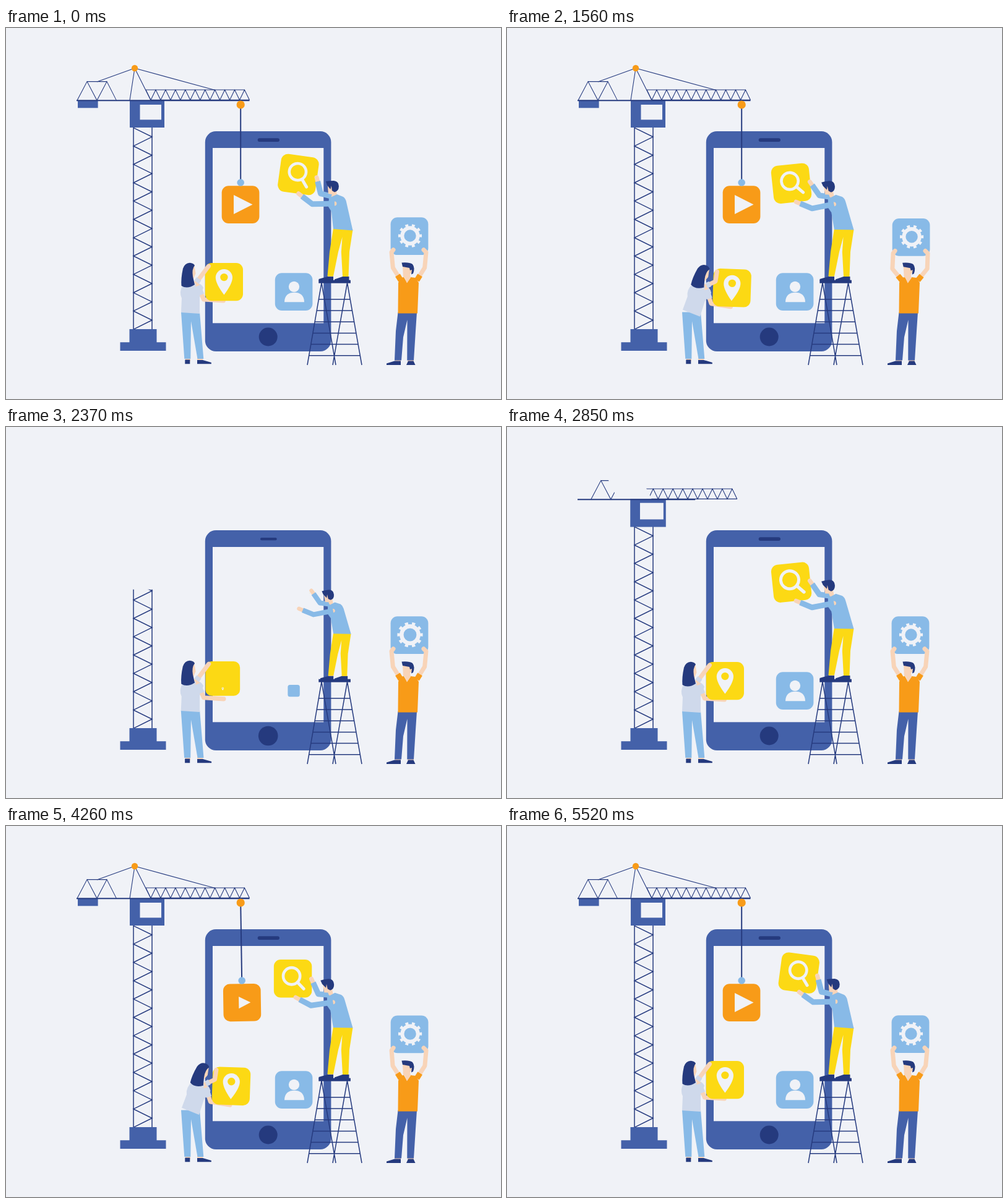
Write an HTML page that moves like this. It is 800 px wide and 600 px high and loops after 5.55 s.

```html
<!DOCTYPE html>
<html lang="en">
<head>
<meta charset="utf-8">
<title>Building an app</title>
<style>
html, body { margin: 0; width: 100%; height: 100%; overflow: hidden; background: #f0f2f7; }
svg { display: block; width: 100vw; height: 100vh; }
.bg { fill: #f0f2f7; }
.blue { fill: #4461a9; }
.navy { fill: #253a7e; }
.sky { fill: #88bae7; }
.yellow { fill: #fcd914; }
.orange { fill: #f89b18; }
.skin { fill: #f8d4b8; }
.lilac { fill: #cfd9eb; }
.line { fill: none; stroke: #263b7f; stroke-width: 1.5; }
.thin { stroke-width: 1.1; }
.thick { stroke-width: 2; }
.arm path { fill: none; stroke: #f8d4b8; stroke-width: 7; stroke-linejoin: round; stroke-linecap: round; }
.arm path + path { stroke: currentColor; stroke-width: 9; stroke-linecap: butt; }
</style>
</head>
<body>
<svg viewBox="0 0 800 600">
  <defs>
    <clipPath id="towerClip"><rect id="towerMask" x="200" width="42"/></clipPath>
    <clipPath id="leftClip"><path d="M100 80H161L180 119H100Z"/></clipPath>
    <clipPath id="rightClip"><path d="M410 97H224L235 119H410Z"/></clipPath>
  </defs>

  <rect id="phone" class="blue" x="321.8" width="203.6"/>
  <rect id="screen" class="bg" x="334" width="179.3"/>
  <rect id="speaker" class="navy" x="406.7" y="178.2" width="35.3" height="5.8" rx="2.9"/>
  <circle id="home" class="navy" cx="423.7" cy="499.5" r="15"/>
  <g id="user">
    <rect class="sky" x="434.8" y="396.3" width="60.6" height="60.6" rx="11"/>
    <g id="userGlyph" class="bg">
      <circle cx="465.5" cy="418.4" r="8.6"/>
      <path d="M450 443.3C450 432 457 427.7 466 427.7S482 432 482 443.3Z"/>
    </g>
  </g>

  <path id="base" class="blue" d="M199.5 487H243.5V508.3H258.5V522H184.5V508.3H199.5Z"/>
  <path id="tower" class="line" clip-path="url(#towerClip)"/>
  <rect id="weight" class="blue" x="116" y="117" width="32.6" height="12.3"/>
  <g id="cab">
    <rect class="blue" x="200" y="117" width="56" height="44"/>
    <rect id="pane" class="bg" x="216.5" y="124" width="34.5" height="24.3"/>
  </g>
  <g clip-path="url(#leftClip)">
    <path id="leftTruss" class="line thin" d="M115 117L131 86.6L147 117L163 86.6L178.5 117M131 86.6H163"/>
  </g>
  <g clip-path="url(#rightClip)"><path id="rightTruss" class="line thin"/></g>
  <path id="beam" class="line thick"/>
  <path id="cables" class="line thin"/>
  <circle id="peak" class="orange" cx="208" cy="65" r="5.2"/>

  <g id="swing">
    <path id="rope" class="line thick"/>
    <g id="play">
      <rect class="orange" x="348.7" y="255.2" width="60.7" height="60.7" rx="11"/>
      <path id="playGlyph" class="bg" d="M368 270L398.5 285.5L368 301Z"/>
    </g>
    <circle id="knob" class="sky" cx="379.2" cy="250" r="5.8"/>
  </g>
  <circle id="hook" class="orange" cx="379.2" cy="124" r="6.6"/>

  <g id="woman">
    <path class="skin" d="M290 533H298V539H290ZM309 533H318V539H309Z"/>
    <path class="navy" d="M289.3 536.5H297.3V543.3H289.3ZM309 537H318L331.8 541V543.3H309Z"/>
    <path class="sky" d="M283 459.5H313L319.3 535H309.5L299 474L298.3 535H288.3Z"/>
    <path id="wBody" class="lilac" d="M286 415L304 414Q313 409 319 420L313 436V462L283 460L284 437Q279 427 286 415Z"/>
    <g id="wLow" class="arm" color="#cfd9eb"></g>
    <g id="wIcon">
      <rect class="yellow" x="-30.6" y="-30.6" width="61.2" height="61.2" rx="11"/>
      <g id="pin">
        <path class="bg" d="M0 21Q-13.6 3 -13.6 -7A13.6 13.6 0 0 1 13.6 -7Q13.6 3 0 21Z"/>
        <circle class="yellow" cy="-7.5" r="6.2"/>
      </g>
    </g>
    <g id="wHigh" class="arm" color="#cfd9eb"></g>
    <g id="wHead">
      <path class="skin" d="M299 385H304.5L306.5 397L304 403L300 413H295Z"/>
      <path class="navy" d="M283.5 417Q282.5 405 286 389Q289 380 297 379.7Q303 380 305 384Q300 390 302 402L305 415Q293 423 283.5 417Z"/>
    </g>
  </g>

  <g id="ladder">
    <path id="ladderLines" class="line"/>
    <rect class="navy" x="505.3" y="407.7" width="51.6" height="5"/>
  </g>

  <g id="climber">
    <path class="skin" d="M520 399H529V404H520ZM544 399H553V404H544Z"/>
    <path class="navy" d="M505.5 409V406L520 402H529V409ZM531 409V406.5L544 402H554.5V409Z"/>
    <path class="yellow" d="M529 324L560.5 326L555 362L553.5 402H544L541.8 362L543.5 338L537 362L529 401.5H519.5L523 362Z"/>
    <g id="cIcon">
      <rect class="yellow" x="-30.7" y="-30.7" width="61.4" height="61.4" rx="11"/>
      <g id="lens" fill="none" stroke="#f0f2f7">
        <circle cx="-2" cy="-4" r="13.6" stroke-width="4.6"/>
        <path d="M7.5 6L17.5 16.5" stroke-width="5" stroke-linecap="round"/>
      </g>
    </g>
    <g id="cHigh" class="arm" color="#88bae7"></g>
    <g id="cHead">
      <path class="skin" d="M520 254L528 252L534 262L535 272L528 273L527 269L521 268Z"/>
      <path class="navy" d="M517 248Q522 247 530 247Q538 248 538 256Q538 264 531 265.5L527 263L526 255L524.5 261L519 254Z"/>
    </g>
    <path id="cBody" class="sky" d="M522 275L535 269L545 273Q549 276 550 281L560.5 327.5L529 325L526 297L521 289Z"/>
    <g id="cLow" class="arm" color="#88bae7"></g>
  </g>

  <g id="lifter">
    <path class="skin" d="M629 535H638V540H629ZM649 535H659V540H649Z"/>
    <path class="navy" d="M615 545V542.5L628 538.5H638V545ZM647 545L650 538.5H658.5L661.5 545Z"/>
    <path class="blue" d="M633.5 460H664L662 490L659 537.5H648.3L648.5 472L642 500L639 537.5H628L630 490Z"/>
    <g id="lIcon">
      <rect class="sky" x="-30.4" y="-30.4" width="60.8" height="60.8" rx="11"/>
      <g id="gear" fill="none" stroke="#f0f2f7" transform="translate(1 -.7)">
        <circle r="12.7" stroke-width="6"/>
        <circle r="16.8" stroke-width="4.6" pathLength="20" stroke-dasharray=".9 1.1" stroke-dashoffset=".45"/>
      </g>
    </g>
    <g id="lLeft" class="arm" color="#f89b18"></g>
    <g id="lRight" class="arm" color="#f89b18"></g>
    <path class="orange" d="M637 404L643 403L648 412L654 403L662 404L667 412L665 461.5H633.5L634 412Z"/>
    <g id="lHead">
      <path class="skin" d="M641 385H654L657 394L653 398L654 404L648 412.5L644 403H642Z"/>
      <path class="navy" d="M639.5 379.5Q652 378.5 657 382Q661.5 388 658 397L655 398.5L656 391L653 392L652 388L641 386Z"/>
    </g>
  </g>
</svg>
<script>
const LOOP = 5550, STEP = 30, RESET = 1600;
const $ = {};
document.querySelectorAll('[id]').forEach(e => $[e.id] = e);
document.querySelectorAll('.arm').forEach(e => e.innerHTML = '<path/><path/>');

const clamp = x => Math.min(1, Math.max(0, x));
const sine = x => (1 - Math.cos(Math.PI * clamp(x))) / 2;
const ramp = (t, a, b) => sine((t - a) / (b - a));
const mix = (a, b, k) => a.map((v, i) => v + (b[i] - v) * k);
const set = (id, o) => { for (const k in o) $[id].setAttribute(k, o[k]); };
const draw = (id, d) => set(id, { d });

// Grows to 1.08, then settles at 1.
function pop(t, start, dur = 500) {
  const x = (t - start) / dur;
  return x < .6 ? 1.08 * sine(x / .6) : 1.08 - .08 * sine((x - .6) / .4);
}
function place(id, [ox, oy], scale = 1, rot = 0, [dx, dy] = [0, 0]) {
  set(id, { transform: `translate(${ox + dx} ${oy + dy}) rotate(${rot}) scale(${scale}) translate(${-ox} ${-oy})` });
}
// Pops a part about a point of its own box, by default the centre.
const boxes = {};
function grow(id, t, start, ay = .5) {
  const b = boxes[id] ??= $[id].getBBox();
  place(id, [b.x + b.width / 2, b.y + b.height * ay], pop(t, start));
}
function rotate([x, y], [ox, oy], deg) {
  const a = deg * Math.PI / 180, c = Math.cos(a), s = Math.sin(a);
  return [ox + (x - ox) * c - (y - oy) * s, oy + (x - ox) * s + (y - oy) * c];
}

// Two-bone arm; cut is where the sleeve ends: 1 is the elbow, 2 the hand.
function arm(id, sh, hand, { a, b, side, cut, tip = [] }) {
  const dx = hand[0] - sh[0], dy = hand[1] - sh[1], len = Math.hypot(dx, dy);
  const m = (a * a - b * b + len * len) / (2 * len) / len;
  const h = side * Math.sqrt(Math.max(0, a * a - m * m * len * len)) / len;
  const elbow = [sh[0] + dx * m - dy * h, sh[1] + dy * m + dx * h];
  const sleeve = cut < 1 ? mix(sh, elbow, cut) : [...elbow, ...mix(elbow, hand, cut - 1)];
  const [skin, cloth] = $[id].children;
  skin.setAttribute('d', 'M' + [...sh, ...elbow, ...hand, ...tip]);
  cloth.setAttribute('d', 'M' + [...sh, ...sleeve]);
}
// Places a held tile and returns a lookup for points on it.
function hold(id, [x, y], rot, scale, [gx, gy]) {
  set(id, { transform: `translate(${x} ${y}) rotate(${rot}) translate(${gx} ${gy}) scale(${scale}) translate(${-gx} ${-gy})` });
  return (px, py) => rotate([x + px, y + py], [x, y], rot);
}

function zigzag(x, y, dx, dy, n, across) {
  let d = `M${x} ${y}`;
  for (let i = 1; i <= n; i++) {
    d += across ? `L${x + (i % 2) * dx} ${y + i * dy}` : `L${x + i * dx} ${y + (i % 2) * dy}`;
  }
  return d;
}
draw('tower', 'M206 161V487M236 161V487' + zigzag(206, 161.3, 30, 14.82, 22, true));
draw('rightTruss', zigzag(226, 100, 7.975, 16.4, 21) + 'M226 100H385.5M234 116.4H393.5');

let rungs = 'M510 412L487 545M510 412L533 545M551.5 412L575 545M551.5 412L528 545';
for (let y = 438.8; y < 535; y += 18.2) {
  const w = (y - 412) * .174;
  rungs += `M${510 - w} ${y}H${551.5 + w}`;
}
draw('ladderLines', rungs);

function climber(t) {
  const down = t < 3500 ? 1 - ramp(t, 2820, 3500)
    : t < 4890 ? ramp(t, 3500, 4890)
    : t < 5590 ? 1 - ramp(t, 4890, 5590) : ramp(t, 5590, 6980);
  const lean = clamp(down * 1.7), hip = [545, 327], rot = 8 - 14 * down;
  const body = (x, y) => rotate([x, y], hip, -3.5 * lean);
  place('climber', [531, 409], pop(t, 2150));
  const on = hold('cIcon', mix([473, 236.3], [459.5, 251.3], down ** .65), rot, pop(t, 2350), [27, 5]);
  set('lens', { transform: `rotate(${Math.max(0, rot * .7)}) scale(${pop(t, 2500)})` });
  arm('cHigh', body(526, 272), on(30, .5), { a: 18, b: 27, side: -1, cut: 1.75 });
  arm('cLow', body(531, 284), on(4.5, 30.5), { a: 36, b: 28, side: -1, cut: 1.74 });
  place('cBody', hip, 1, -3.5 * lean);
  place('cHead', [528, 262], 1, -6 * lean, [-7.5 * lean, lean / 2]);
}

function woman(t) {
  const k = t < 4300 ? ramp(t, 3400, 4200)
    : t < 6400 ? 1 - ramp(t, 4360, 5100) : ramp(t, 6450, 7200);
  const hip = [297, 461], rot = 18 * k;
  place('woman', [304, 544], pop(t, 1920));
  place('wBody', hip, 1, rot);
  place('wHead', hip, 1, rot);
  const on = hold('wIcon', mix([352.4, 410.6], [364, 420.7], k), 2 * k, pop(t, 2150), [-27, -22]);
  grow('pin', t, 2300, 1);
  arm('wLow', rotate([310, 417], hip, rot), on(-1, 30.5), { a: 24, b: 32, side: 1, cut: .65 });
  arm('wHigh', rotate([308, 411], hip, rot), on(-25, -25.5), { a: 16, b: 16, side: 1, cut: .4 });
}

function lifter(t) {
  const k = t < 2850 ? 0 : (1 - Math.cos((t - 2850) / 1340 * 2 * Math.PI)) / 2;
  place('lifter', [638, 545], pop(t, 1680));
  const on = hold('lIcon', [652 + 3.8 * k, 336.7 + 6 * k], 0, pop(t, 1820), [-26, 23]);
  set('gear', { transform: `translate(1 -.7) scale(${pop(t, 2050)})` });
  place('lHead', [648, 400], 1, 0, [-1.2 * k, .6 * k]);
  const bones = { a: 24, b: 25, cut: .4 };
  arm('lLeft', [638, 408], on(-29, 26), { ...bones, side: -1, tip: on(-26, 22) });
  arm('lRight', [664, 408], on(27, 26), { ...bones, side: 1, tip: on(23, 22) });
}

function phone(t) {
  const h = 356 * ramp(t, 1650, 1900), s = 283.3 * ramp(t, 1893, 2163);
  set('phone', { y: 523 - h, height: h, rx: Math.min(17.5, h / 2) });
  set('screen', { y: 477.3 - s, height: s });
  ['home', 'speaker', 'user', 'userGlyph'].forEach((id, i) => grow(id, t, 2100 + 80 * i));
}

function crane(t) {
  grow('base', t, 1710, 1);
  const h = 328 * ramp(t, 2060, 2560);
  set('towerMask', { y: 487 - h, height: h });
  ['cab', 'pane'].forEach((id, i) => grow(id, t, 2430 + 70 * i));
  set('leftTruss', { transform: `translate(${68 * (1 - ramp(t, 2640, 2975))} 0)` });
  set('rightTruss', { transform: `translate(${-175 * (1 - ramp(t, 2580, 2930))} 0)` });
  const b = ramp(t, 2640, 2980);
  draw('beam', b ? `M114 117.3h${279.5 * b}` : 'M0 0');
  grow('weight', t, 2950, 0);
  grow('peak', t, 2950);
  const c = ramp(t, 3020, 3300), top = [208, 65];
  const ends = [[147, 87], [200, 117], [234, 117], [338, 100.5]];
  draw('cables', c ? ends.map(end => `M${top}L${mix(top, end, c)}`).join('') : 'M0 0');

  grow('hook', t, 3100);
  const r = ramp(t, 3250, 3530);
  draw('rope', r ? `M379.2 124v${123 * r}` : 'M0 0');
  const u = Math.max(0, t - 3700);
  const sway = -2.8 * Math.exp(-u / 700) * Math.sin(u / 750 * Math.PI) * clamp((5400 - t) / 600);
  place('swing', [379.2, 124], 1, sway);
  grow('knob', t, 3560);
  grow('play', t, 3720, 0);
  grow('playGlyph', t, 4095);
}

function render(ms) {
  const now = Math.floor((ms + 8) / STEP) * STEP % LOOP;
  const t = now < RESET ? now + LOOP : now;
  phone(t);
  crane(t);
  woman(t);
  place('ladder', [531, 545], pop(t, 1762));
  climber(t);
  lifter(t);
}

const begin = performance.now();
function tick() {
  render(performance.now() - begin);
  requestAnimationFrame(tick);
}
tick();
</script>
</body>
</html>
```
